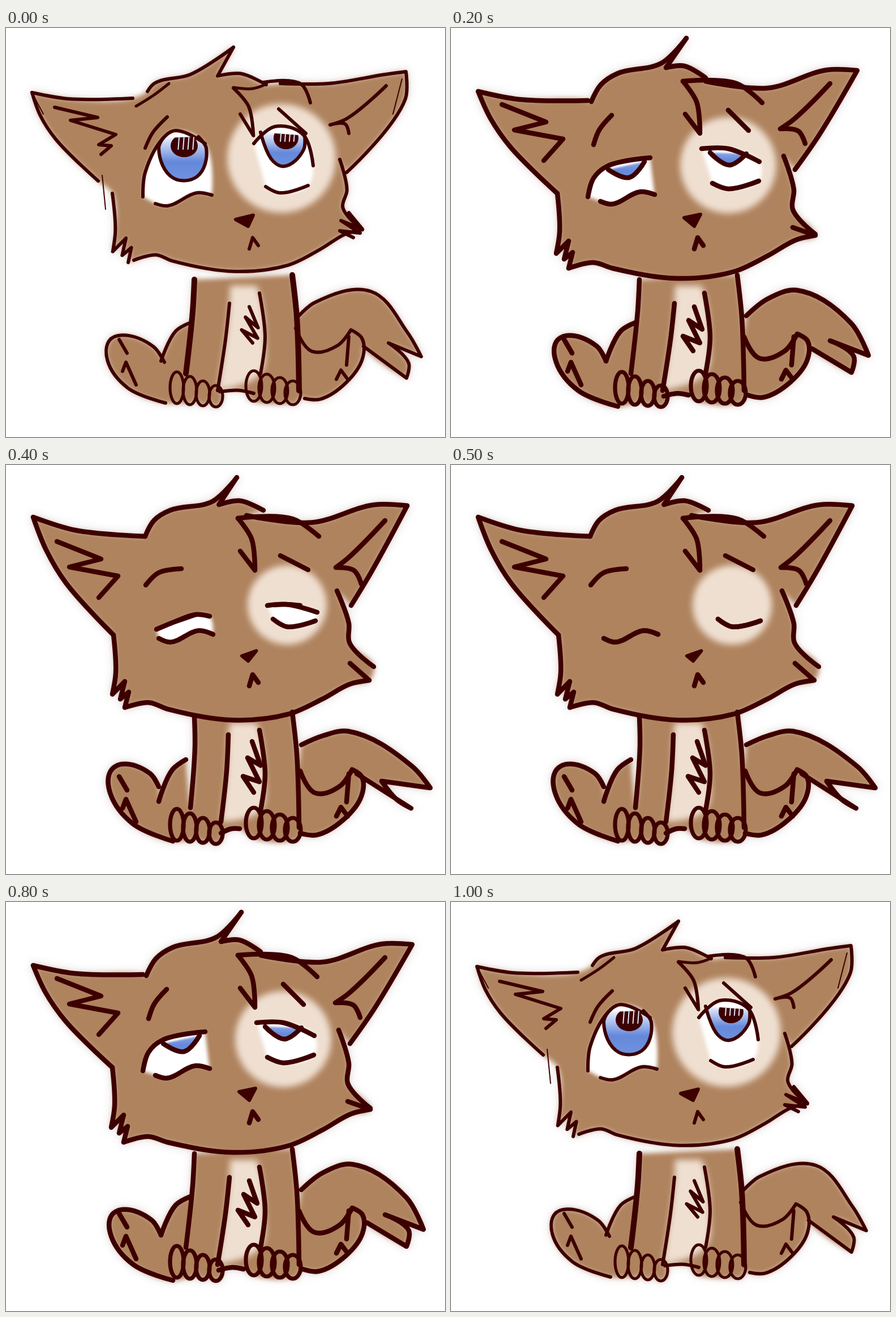
Recreate the animation shown at these times as an HTML page with a canvas. Size 776 px wide and 722 px high, loop 1300 ms.

```html
<!DOCTYPE html>
<html lang="en">
<head>
<meta charset="utf-8">
<title>Sleepy blink</title>
<style>
html, body { margin: 0; width: 100%; height: 100%; overflow: hidden; background: #fff; }
canvas { display: block; }
</style>
</head>
<body>
<canvas id="stage" width="776" height="722"></canvas>
<script>
const W = 776, H = 722, STEP = 100;
const INK = '#3d0000', FUR = '#af835e', CREAM = '#efdfd1';

// Each part is a stroke through a few x, y points.
const ears = {
  earTop: [48,112, 120,126, 242,128],
  earL: [48,112, 70,160, 105,210, 188,292],
  earInL: [90,135, 168,166, 112,180, 198,196, 164,234],
  earR: [450,94, 560,106, 665,74, 718,75, 650,190, 608,250],
  earInR: [670,98, 605,162, 582,178, 614,182, 626,204]
};
const head = {
  crown: [248,130, 265,100, 295,80, 372,62, 416,18],
  tuft: [416,18, 380,70, 412,67, 450,88],
  fringe: [410,94, 505,98, 550,132],
  lock: [410,94, 434,130, 440,186, 414,152],
  faceR: [588,226, 606,285, 604,320, 644,364],
  furR: [604,352, 644,366],
  jaw: [644,366, 610,374, 560,402, 500,430, 400,442, 285,424, 252,414, 208,424],
  cheek: [188,292, 192,360, 186,398, 208,376, 200,408, 215,396, 208,424]
};
const face = {
  browL: [252,206, 262,180, 284,154],
  browR: [490,145, 526,181],
  lidL: [242,298, 252,265, 276,244, 352,229],
  irisL: [278,250, 315,264, 342,236],
  lowL: [264,306, 284,311, 335,289, 360,294],
  lidR: [443,213, 490,213, 545,236],
  irisR: [458,220, 492,242, 522,222],
  lowR: [462,274, 490,284, 544,270],
  nose: [412,335, 441,329, 430,350],
  mouth: [430,390, 436,370, 446,384],
  patch: [490,242, 85]
};
const torso = {
  armL: [333,444, 330,500, 318,610],
  armInL: [395,486, 388,550, 374,640],
  armInR: [448,468, 458,545, 450,610],
  armR: [506,436, 514,510, 518,640],
  chest: [430,492, 444,532, 420,516, 440,556, 410,544, 428,570],
  belly: [376,650, 400,645, 420,648]
};
const limbs = {
  hip: [326,520, 300,535, 274,588],
  legL: [274,588, 258,562, 205,543, 186,554, 186,590, 225,640, 295,668],
  legR: [518,545, 545,583, 590,570, 612,540, 630,552, 630,585, 600,625, 552,652, 524,648],
  tail: [522,508, 560,478, 612,463, 708,522, 738,578, 670,552, 712,580, 708,608, 638,566],
  toeL: [200,550, 214,574],
  padL: [206,606, 212,590, 230,630],
  toeR: [606,545, 602,595],
  padR: [584,620, 592,604, 604,620]
};
const heavy = { ...ears, ...head, ...face, ...torso, ...limbs };

// Moves the start of a stroke by one offset and its end by another.
const bend = (flat, [x0, y0, x1, y1]) => flat.map((v, i) => {
  const t = (i >> 1) / (flat.length / 2 - 1);
  return i % 2 ? v + y0 + (y1 - y0) * t : v + x0 + (x1 - x0) * t;
});
function pose(bends, redrawn) {
  const p = { ...heavy, ...redrawn };
  for (const k in bends) p[k] = bend(p[k], bends[k]);
  return p;
}

const awake = pose({
  earTop: [-2,2, -18,-4], earL: [-2,2, -25,-22], tuft: [-14,16, 10,12],
  fringe: [45,2, -12,0], lock: [-8,12, 0,0], earInR: [2,4, -20,-18],
  faceR: [2,6, -14,-8], jaw: [-14,-10, 18,-14], cheek: [0,0, 8,-10],
  browL: [-6,6, 1,3], browR: [-8,-2, 4,5], lowL: [0,4, 4,1], lowR: [-3,6, -10,8],
  nose: [-6,3, -2,0], chest: [0,0, 8,-14], belly: [2,-8, 18,-3],
  legL: [6,2, -13,-6], legR: [-6,-15, 4,6]
}, {
  earInL: [86,140, 162,158, 114,163, 194,188, 164,206, 186,208, 168,223],
  crown: [250,112, 262,98, 326,82, 402,34].map((v, i) => i > 5 ? v + (i % 2 ? -16 : 14) : v),
  earR: [485,98, 570,98, 670,82, 707,77, 706,125, 602,255],
  furR: [606,326, 630,355, 592,340, 626,362, 590,358, 614,370],
  lidL: [242,298, 246,255, 282,190, 300,181, 352,204],
  irisL: [278,194, 270,212, 296,265, 338,262, 354,212, 340,192],
  lidR: [438,204, 475,174, 525,188, 543,243],
  irisR: [450,184, 472,235, 492,244, 526,215, 528,190],
  patch: [487,230, 96],
  tail: [514,512, 545,485, 645,465, 710,538, 734,580, 676,556, 712,592, 708,618, 632,562]
});
awake.crown = [250,112, 262,98, 326,82, 402,34];

const drowsy = pose({
  earInL: [0,-5, 2,-4], crown: [-4,2, -8,12], tuft: [-8,12, -6,2],
  fringe: [-6,4, -5,8], lock: [-6,4, -4,-4], earR: [-4,2, -10,12],
  earInR: [4,0, -6,-10], faceR: [5,8, -10,0], furR: [2,-10, -10,0],
  jaw: [-10,0, 2,-6], browL: [-2,0, -4,6], browR: [-3,2, 8,2], lowR: [0,2, -8,4],
  tail: [-6,-6, -3,-4], chest: [2,0, -6,-8]
}, {
  lidL: [242,294, 250,255, 275,220, 305,201, 354,210],
  irisL: [276,222, 276,248, 315,268, 344,250, 352,212],
  lidR: [440,200, 490,189, 525,202, 546,240],
  irisR: [452,202, 465,230, 492,242, 515,234, 526,206],
  patch: [491,235, 88]
});

const slit = pose({
  earTop: [0,-20, 4,-2], earL: [0,-20, 2,8], crown: [-2,-4, -8,4], tuft: [-8,4, 5,-8],
  fringe: [0,0, 3,-6], earR: [-25,-5, 2,-2], earInR: [0,0, 2,6],
  faceR: [-3,-4, 6,-8], furR: [4,-2, -2,14], jaw: [-2,14, 2,4], cheek: [2,8, 2,4],
  browR: [-5,15, 8,4], lowL: [6,0, 6,5], lowR: [10,-2, 3,5], nose: [5,2, -2,-4],
  armL: [0,0, 8,-5], armInL: [-2,-10, 6,-10], chest: [5,-4, 10,8],
  hip: [-8,0, -4,6], legL: [-4,-20, 0,-4], belly: [4,0, -7,-6], legR: [2,-5, -4,2]
}, {
  browL: [247,212, 270,190, 310,183],
  lidL: [266,290, 300,276, 335,264, 360,267],
  irisL: [300,276, 318,270, 335,264],
  lidR: [462,248, 495,246, 550,260],
  irisR: [475,247, 495,246, 520,248],
  patch: [497,247, 70],
  tail: [522,494, 560,478, 605,470, 718,532, 750,570, 664,558, 690,590, 716,606, 620,545]
});

const half = {};
for (const k in heavy) half[k] = heavy[k].map((v, i) => (v + slit[k][i]) / 2);
const shut = { ...slit, lidL: slit.lowL, lidR: slit.lowR, irisL: [], irisR: [] };

const pairs = flat => {
  const out = [];
  for (let i = 0; i < flat.length; i += 2) out.push([flat[i], flat[i + 1]]);
  return out;
};
const reversed = flat => pairs(flat).reverse().flat();

// Smooth line through the points; sharp turns stay corners.
function curve(flat) {
  const path = new Path2D(), pts = pairs(flat);
  if (!pts.length) return path;
  const slopes = pts.map((p, i) => {
    const a = pts[i - 1], b = pts[i + 1];
    if (!a || !b) return [0, 0];
    const ux = p[0] - a[0], uy = p[1] - a[1], vx = b[0] - p[0], vy = b[1] - p[1];
    const lu = Math.hypot(ux, uy) || 1, lv = Math.hypot(vx, vy) || 1;
    if ((ux * vx + uy * vy) / (lu * lv) < 0.2) return [0, 0];
    const dx = ux / lu + vx / lv, dy = uy / lu + vy / lv, d = Math.hypot(dx, dy);
    return [dx / d, dy / d];
  });
  path.moveTo(...pts[0]);
  for (let i = 1; i < pts.length; i++) {
    const [ax, ay] = pts[i - 1], [bx, by] = pts[i], s = slopes[i - 1], e = slopes[i];
    const k = Math.hypot(bx - ax, by - ay) / 3;
    path.bezierCurveTo(ax + s[0] * k, ay + s[1] * k, bx - e[0] * k, by - e[1] * k, bx, by);
  }
  return path;
}

function oval(x, y, rx, ry = rx) {
  const path = new Path2D();
  path.ellipse(x, y, rx, ry, 0, 0, Math.PI * 2);
  return path;
}

const paws = [];
for (let i = 0; i < 4; i++) {
  paws.push(oval(302 + 23 * i, 635 + 5 * i, 12, 28 - 3 * i));
  paws.push(oval(438 + 23 * i, 632 + 4 * i, 14, 27 - 2 * i));
}

function layer(paint) {
  const cv = document.createElement('canvas');
  cv.width = W;
  cv.height = H;
  const g = cv.getContext('2d');
  g.lineCap = g.lineJoin = 'round';
  paint(g);
  return cv;
}

function soft(g, blur, image, alpha = 1) {
  g.filter = `blur(${blur}px)`;
  g.globalAlpha = alpha;
  g.drawImage(image, 0, 0);
  g.filter = 'none';
  g.globalAlpha = 1;
}

const paintFur = p => layer(g => {
  g.fillStyle = FUR;
  const shapes = [
    [p.earTop, p.crown, p.tuft, p.earR, p.faceR, p.jaw, reversed(p.cheek), reversed(p.earL)],
    [p.hip, p.legL, [330, 660]],
    [p.armL, [315, 650, 375, 660], p.belly, [440, 660, 515, 655], reversed(p.armR)],
    [p.tail, p.legR.slice(8), [505, 640]]
  ];
  shapes.forEach(s => g.fill(curve(s.flat())));
  paws.forEach(o => g.fill(o));
});

const paintCream = p => layer(g => {
  g.fillStyle = CREAM;
  g.fill(oval(...p.patch));
  g.fill(curve([[396, 455], p.armInL, reversed(p.armInR), [442, 455]].flat()));
});

const paintWhites = p => layer(g => {
  g.fillStyle = '#fff';
  g.fill(curve([...p.lidL, ...reversed(p.lowL)]));
  g.fill(curve([...p.lidR, ...reversed(p.lowR)]));
});

const paintIris = p => layer(g => {
  for (const iris of [p.irisL, p.irisR]) {
    if (!iris.length) continue;
    const ys = iris.filter((v, i) => i % 2);
    const top = Math.min(...ys), low = Math.max(...ys);
    const blue = g.createLinearGradient(0, top, 0, low);
    blue.addColorStop(0, low - top > 35 ? '#eef2fd' : '#8ba5e6');
    blue.addColorStop(0.6, '#6488da');
    blue.addColorStop(1, '#6f90de');
    g.fillStyle = blue;
    g.fill(curve(iris));
  }
});

function pupil(g, iris, hatched, x, y, rx, ry) {
  g.save();
  g.clip(curve(iris));
  g.fill(oval(x, y, rx, ry));
  g.strokeStyle = '#dfe6fa';
  g.lineWidth = 2;
  for (let i = -1; hatched && i < 3; i++) {
    const sx = x + i * rx * 0.36;
    g.stroke(curve([sx, y - ry, sx - 2, y + ry * 0.3]));
  }
  g.restore();
}

const paintInk = (p, width) => layer(g => {
  g.strokeStyle = g.fillStyle = INK;
  g.lineWidth = width;
  for (const k in p) if (k !== 'patch' && k !== 'nose') g.stroke(curve(p[k]));
  g.lineWidth = width * 0.85;
  paws.forEach(o => g.stroke(o));
  const nose = curve(p.nose);
  nose.closePath();
  g.lineWidth = 6;
  g.fill(nose);
  g.stroke(nose);
  if (p === drowsy) {
    pupil(g, p.irisL, false, 318, 206, 22, 18);
    pupil(g, p.irisR, false, 492, 202, 22, 16);
  }
  if (p === awake) {
    pupil(g, p.irisL, true, 315, 208, 24, 20);
    pupil(g, p.irisR, true, 495, 194, 22, 20);
    g.lineWidth = 10;
    g.stroke(curve(p.armL));
    g.stroke(curve(p.armR));
    g.lineWidth = 5;
    g.stroke(curve([288,98, 262,118, 230,138]));
    g.stroke(curve([402,105, 436,107, 458,100]));
    g.lineWidth = 2;
    g.stroke(curve([48,118, 66,152]));
    g.stroke(curve([170,260, 176,320]));
    g.stroke(curve([700,90, 684,152]));
  }
});

const render = (p, width) => layer(g => {
  g.fillStyle = '#fff';
  g.fillRect(0, 0, W, H);
  const ink = paintInk(p, width);
  soft(g, 8, ink, 0.16);
  soft(g, 4, paintFur(p));
  soft(g, 6, paintCream(p));
  soft(g, 3, paintWhites(p));
  soft(g, 1.5, paintIris(p));
  g.drawImage(ink, 0, 0);
});

const open = render(awake, 6), sleepy = render(drowsy, 9);
const [low, narrow, thin, closed] = [heavy, half, slit, shut].map(p => render(p, 8.5));
const blink = [open, sleepy, low, narrow, thin, closed, thin, narrow, low, sleepy, open, open, open];

const screen = document.getElementById('stage').getContext('2d');
function tick() {
  const step = Math.floor(performance.now() / STEP) % blink.length;
  screen.drawImage(blink[step], 0, 0);
  requestAnimationFrame(tick);
}
tick();
</script>
</body>
</html>
```
